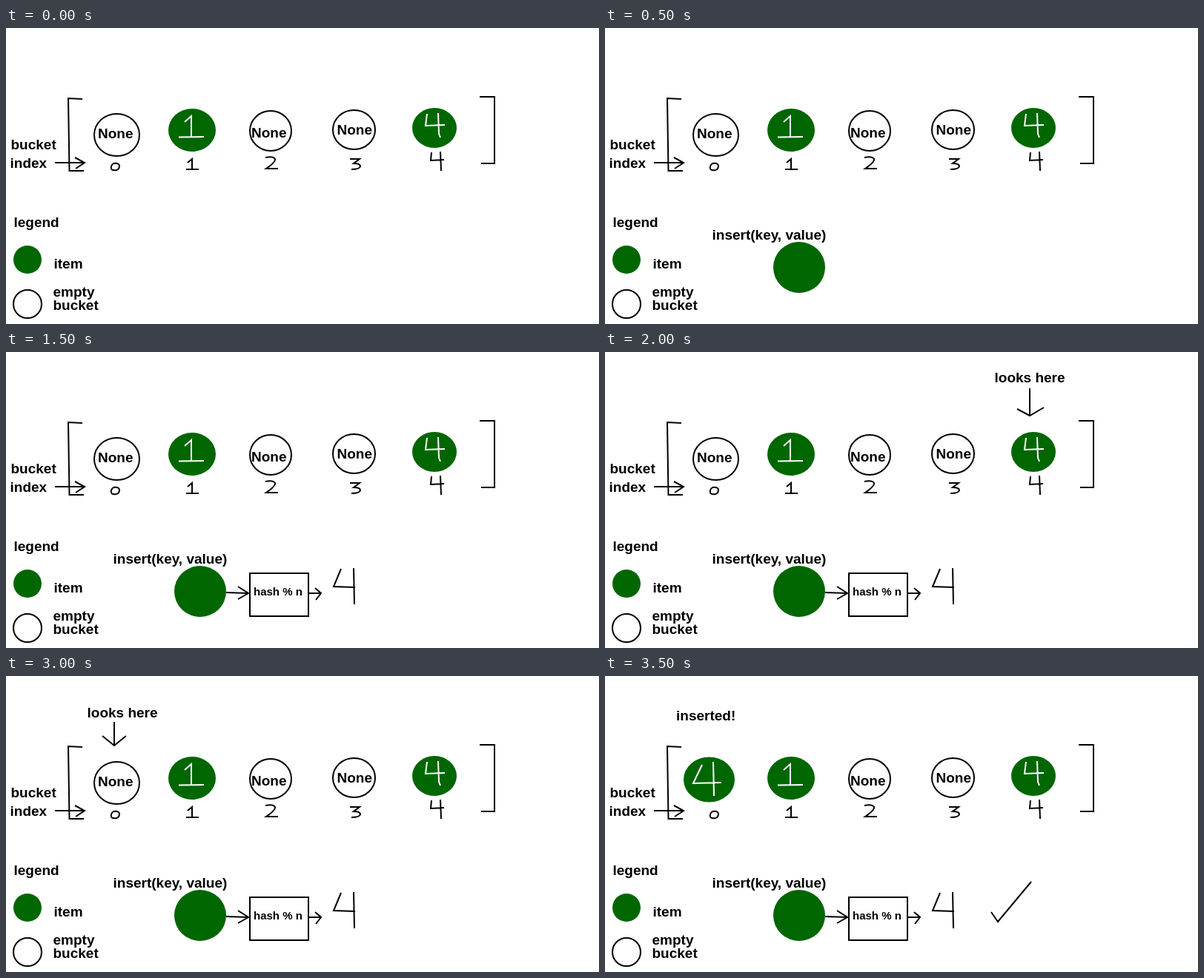
These frames come from a looping animation (800x400 px, 4.5 s). An HTML page:

```html
<!DOCTYPE html>
<html lang="en">
<head>
<meta charset="utf-8">
<title>Hash table insert</title>
<style>
  html, body { margin: 0; height: 100%; overflow: hidden; background: #fff; }
  svg { display: block; }
  text { font: bold 19px "Liberation Sans", Arial, sans-serif; }
  .small { font-size: 15px; }
  path, .empty { fill: none; stroke: #000; stroke-width: 2; }
  .item { fill: #060; }
  .item + path { stroke: #fff; }
</style>
</head>
<body>
<svg width="800" height="400" viewBox="0 0 800 400">
  <!-- bucket array -->
  <path d="M103 96L84 95L85.500 193H105M639 93H659V183H641"/>
  <path d="M66 182H106M93 175L106 182L94 190"/>
  <text x="6.500" y="164">bucket</text>
  <text x="5.500" y="189">index</text>

  <g data-from="0" data-to="3500">
    <ellipse class="empty" cx="149.500" cy="144.500" rx="30.500" ry="28.500"/>
    <text x="124" y="149">None</text>
  </g>
  <g data-from="3500" data-to="4500">
    <ellipse class="item" cx="140.500" cy="140" rx="34.500" ry="30.500"/>
    <path d="M131 120L119 145L157 144M146 116L147 162"/>
    <text x="96" y="60">inserted!</text>
    <path d="M521 319L530 332L575 278"/>
  </g>
  <ellipse class="item" cx="251" cy="138" rx="32" ry="29"/>
  <path d="M241 127L250 119V147M233 147.500L267 147"/>
  <ellipse class="empty" cx="357" cy="139" rx="28" ry="27"/>
  <text x="331" y="148">None</text>
  <ellipse class="empty" cx="469.500" cy="137.500" rx="28.500" ry="26.500"/>
  <text x="446.500" y="144">None</text>
  <ellipse class="item" cx="578" cy="135" rx="30" ry="27"/>
  <path d="M568 116L566 132L592 131M583 115L584 143L586 148"/>

  <!-- index digits -->
  <path d="M145 183Q141 186 142 190Q143 193 149 192Q153 191 153 186Q152 182 145 183"/>
  <path d="M245 182L251 177V191M243 191H260"/>
  <path d="M350 175Q360 173 363 177Q364 181 351 190L367 190"/>
  <path d="M464 177H477L469 183Q478 183 478 187Q477 191 466 191"/>
  <path d="M574 168L573 179L591 178M586 167L587 193"/>

  <!-- legend -->
  <text x="10.500" y="269">legend</text>
  <circle class="item" cx="29" cy="313" r="19"/>
  <text x="64.500" y="325">item</text>
  <circle class="empty" cx="29" cy="373" r="19"/>
  <text x="63.500" y="363">empty</text>
  <text x="63.500" y="381">bucket</text>

  <!-- insertion steps -->
  <g data-from="500" data-to="4500">
    <text x="144.500" y="286">insert(key, value)</text>
    <ellipse class="item" cx="262" cy="323.500" rx="35" ry="34.500"/>
  </g>
  <g data-from="1000" data-to="4500">
    <path d="M297 325L327 326M313 317L327 326L313 334M329 299H408V357H329Z"/>
    <text class="small" x="334" y="329">hash % n</text>
  </g>
  <g data-from="1500" data-to="4500">
    <path d="M409 326H425M417 319L425 326L418 335"/>
    <path d="M452 293L442 317L471 318M469 292L470 341"/>
  </g>
  <g data-from="2000" data-to="2500">
    <text x="525.500" y="41">looks here</text>
    <path d="M573 49V86M556 77L573 86L592 75"/>
  </g>
  <g data-from="3000" data-to="3500">
    <text x="109.500" y="56">looks here</text>
    <path d="M146 62V94M130 81L146 94L162 81"/>
  </g>
</svg>
<script>
  const LOOP = 4500;
  const steps = document.querySelectorAll('[data-from]');
  const start = performance.now();

  function draw(now) {
    const t = Math.max(0, now - start) % LOOP;
    for (const step of steps) {
      const { from, to } = step.dataset;
      step.style.display = t >= +from && t < +to ? '' : 'none';
    }
    requestAnimationFrame(draw);
  }
  draw(start);
</script>
</body>
</html>
```
